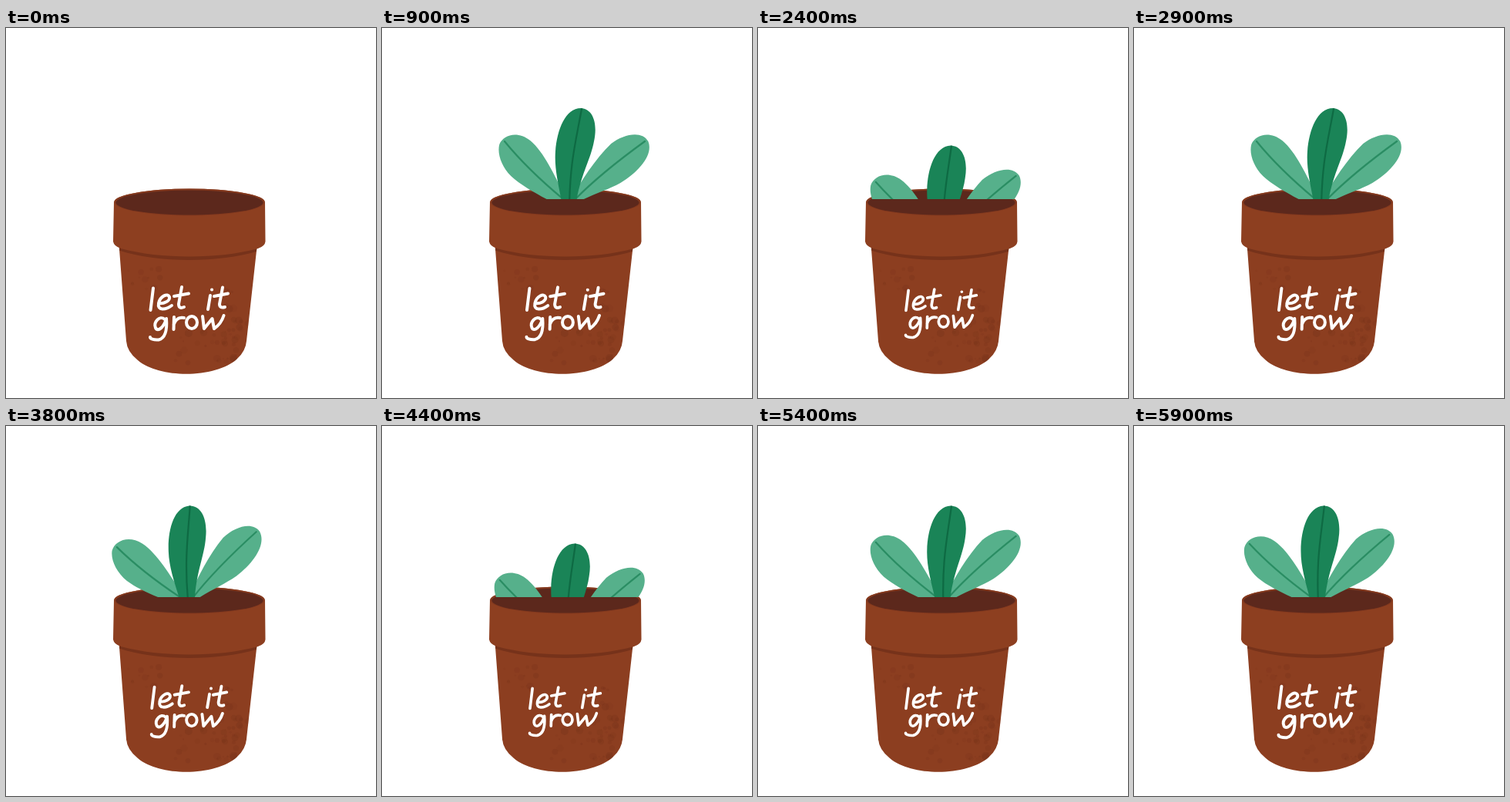
An HTML page that plays this animation: 480x480 px, repeating every 6000 ms.

```html
<!DOCTYPE html>
<html lang="en">
<head>
<meta charset="utf-8">
<title>Growing plant</title>
<style>
  html, body { margin: 0; width: 100%; height: 100%; overflow: hidden; background: #fff; }
  svg { display: block; width: 100%; height: 100%; }
  .stroke { fill: none; stroke-linecap: round; stroke-linejoin: round; }
</style>
</head>
<body>
<svg viewBox="0 0 480 480" role="img" aria-label="Plant pot with the words: let it grow">
  <defs>
    <path id="body" d="M146.500 280 L156 406 Q157 420 171 431 C199 455 272 455 300 429 Q311 419 312 406 L326 280Z"/>
    <clipPath id="bodyClip"><use href="#body"/></clipPath>
    <clipPath id="soilLine"><rect width="480" height="222"/></clipPath>
  </defs>

  <use href="#body" fill="#8c3e20"/>
  <g clip-path="url(#bodyClip)">
    <g id="specks" fill="#74301a"></g>
    <path d="M140 286 C190 306 286 306 336 286 V270 H140Z" fill="#76321a"/>
  </g>
  <path d="M140 226 L139 277 Q140 283 149 286 C200 300 276 300 327 286 Q336 283 336.500 277 L336 226 A98 17.500 0 0 0 140 226Z" fill="#8d3f20"/>
  <ellipse cx="238" cy="226" rx="97.500" ry="17.500" fill="#84391e"/>
  <ellipse cx="238" cy="226.500" rx="95.500" ry="16" fill="#5c281c"/>

  <g clip-path="url(#soilLine)">
    <g id="plant">
      <g fill="#56b08b" transform="translate(-.7 0)">
        <path d="M243 237 C227 228 187 210 168 192 C155 179 150 162 153 151 C158 138 177 133 193 146 C211 161 225 192 237 216Z"/>
        <path d="M238 236 C250 213 273 174 298 150 C315 137 338 133 346 147 C353 164 335 186 310 201 C288 213 262 219 238 236Z"/>
      </g>
      <g class="stroke" stroke="#2a8d63" stroke-width="2.200">
        <path d="M159 147 C181 174 207 199 240 226"/>
        <path d="M341 147 C312 168 276 195 245 228"/>
      </g>
      <path d="M237 250 C232 212 223 188 225 160 C227 132 238 104 258 104 C274 105 280 124 275 147 C270 175 253 196 249 250Z" fill="#1a8457"/>
      <path class="stroke" d="M259 105 C252 145 243 175 243 240" stroke="#0e6a43" stroke-width="2.200"/>
    </g>
  </g>

  <g id="words" class="stroke" stroke="#fff" stroke-width="4">
    <path d="M191 337.500 L187.500 366"/>
    <path d="M198 357 C205 358 213 354 212 349 C210 343 200 348 198 357 C196 367 207 366 215 360"/>
    <path d="M228 336 L224 358 Q224 365 231 362 M218 348 L237 344.500"/>
    <path d="M265 347 L262 365 M267 339.500 h.1"/>
    <path d="M281 336.500 L277 358 Q277 364 284 362 M270 348 L288 344.500"/>
    <path d="M206 378 C199 372 191 382 194 389 C197 395 205 388 208 377 C209 389 208 402 198 404.500 C191 405 187 403 187 401"/>
    <path d="M218 375 L217.500 391 M217.500 385 Q221 374 231 376"/>
    <ellipse cx="241" cy="382" rx="7" ry="8"/>
    <path d="M255 374 L257 390 L267.500 377 L270 390 Q279 384 282.500 373"/>
  </g>
</svg>
<script>
  const LOOP = 2000, STEP = 100;
  const byId = id => document.getElementById(id);
  const plant = byId('plant'), words = byId('words');

  let seed = 7;
  const random = () => (seed = seed * 16807 % 2147483647) / 2147483647;

  function addSpecks(count, x, y, width, height) {
    let dots = '';
    for (let i = 0; i < count; i++) {
      const cx = x + random() * width, cy = y + random() * height;
      dots += `<circle cx="${cx}" cy="${cy}" r="${1 + random() * 4}" opacity="${0.1 + random() * 0.2}"/>`;
    }
    byId('specks').insertAdjacentHTML('beforeend', dots);
  }
  addSpecks(45, 220, 378, 85, 58);
  addSpecks(14, 155, 312, 45, 28);
  addSpecks(14, 270, 335, 45, 60);

  const ease = p => (1 - Math.cos(Math.PI * p)) / 2;

  // keys: [time, value] pairs joined by eased moves
  function tween(keys, t) {
    for (let i = 1; i < keys.length; i++) {
      const [t0, v0] = keys[i - 1], [t1, v1] = keys[i];
      if (t <= t1) return v0 + (v1 - v0) * ease((t - t0) / (t1 - t0));
    }
    return keys[keys.length - 1][1];
  }

  const DROP = [[0, 126], [700, 0]];
  const SWAY = [[0, 0], [700, 0], [1100, 5], [1700, -5], [2000, 0]];
  const PULSE = [[0, 1], [500, 0.9], [1000, 1]];
  const LEAN = 2.5; // the leaves are drawn leaning right

  function draw(now) {
    const t = Math.floor(now / STEP) * STEP % LOOP;
    plant.setAttribute('transform',
      `translate(0 ${tween(DROP, t)}) rotate(${tween(SWAY, t) - LEAN} 244 291)`);
    words.setAttribute('transform',
      `translate(237 370) scale(${tween(PULSE, t % 1000)}) translate(-237 -370)`);
  }

  let start;
  function tick(now) {
    start ??= now;
    draw(now - start);
    requestAnimationFrame(tick);
  }
  draw(0);
  requestAnimationFrame(tick);
</script>
</body>
</html>
```
